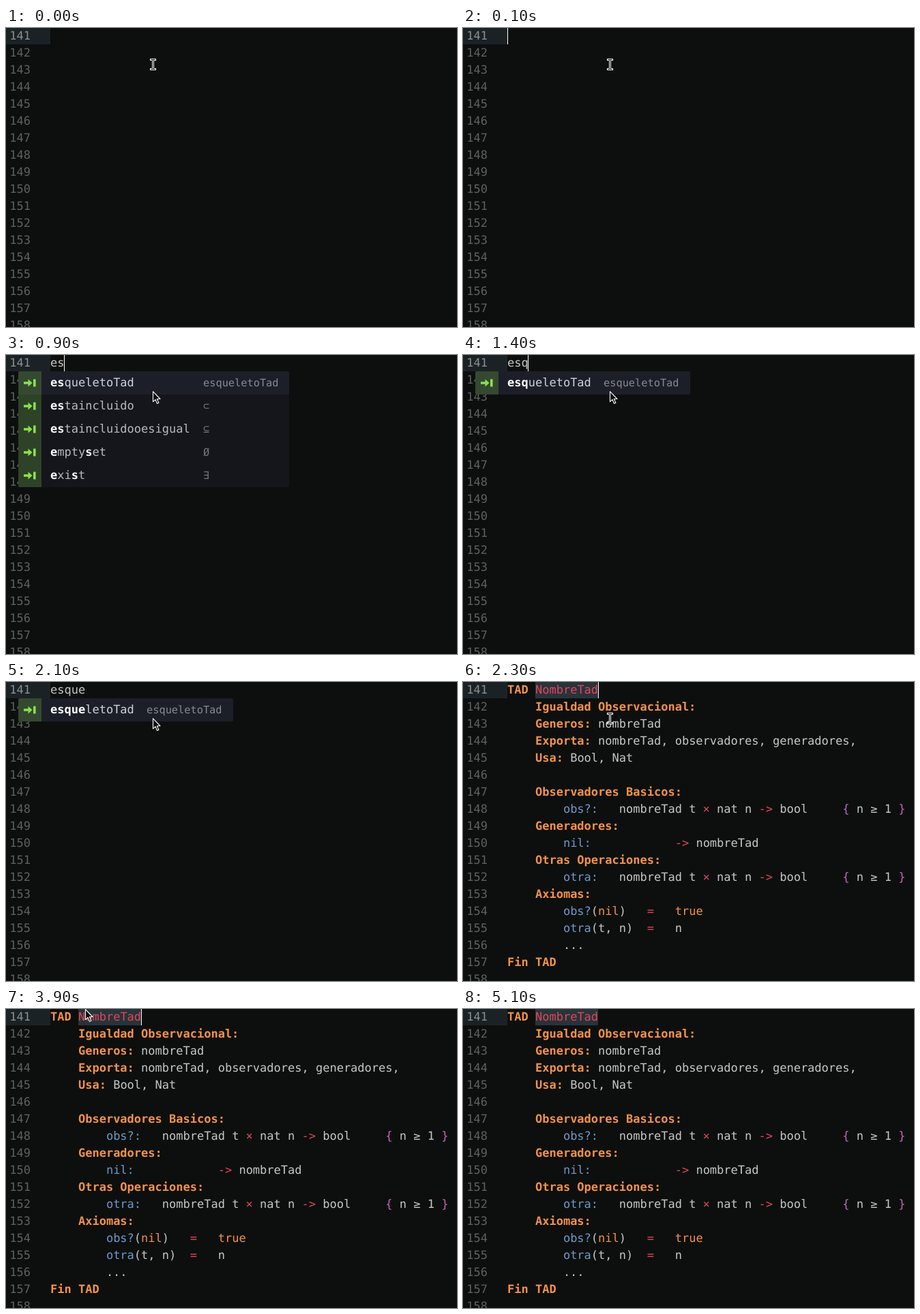
These frames come from a looping animation (661 by 439 pixels, 5200 ms). An HTML page:

```html
<!DOCTYPE html>
<html lang="es">
<head>
<meta charset="utf-8">
<title>Autocompletado</title>
<style>
  html, body { margin: 0; width: 100%; height: 100%; overflow: hidden; background: #0d0f0e; }
  #stage {
    position: relative; width: 661px; height: 439px; overflow: hidden;
    background: #0d0f0e; color: #c5c8c6;
    font: 17px/24px "DejaVu Sans Mono", monospace;
    text-rendering: geometricPrecision; font-variant-ligatures: none;
  }
  #stage div, #stage svg { position: absolute; left: 0; top: 0; }
  #stage #band { width: 65px; height: 24px; background: #1b2225; }
  #stage #pick { left: 106px; width: 92px; height: 24px; background: #29333a; }
  #nums { width: 36px; }
  #stage .num { left: auto; right: 0; color: #5d605f; }
  #stage .num:first-child { color: #8a8f90; }
  #stage .line { left: 65px; white-space: pre; }
  .k { color: #f4924c; font-weight: bold; }
  .v { color: #f0924a; }
  .r { color: #e0465a; }
  .b { color: #6f99c8; }
  .p { color: #c264c0; }
  #caret { width: 1px; height: 24px; background: #fff; }
  #stage #popup { left: 18px; top: 24px; background: #15161c; border-radius: 2px; overflow: hidden; }
  .row { width: 100%; height: 34px; line-height: 34px; color: #b6bac2; }
  .row:first-child { background: #1c1f28; color: #ced2d8; }
  .row b { color: #fff; }
  .tag { width: 34px; height: 34px; background: rgba(139, 224, 78, .22); }
  #stage .name { left: 47px; }
  .info { font-size: 15.3px; color: #74787f; }
  .row:first-child .info { color: #868a92; }
  #ibeam, #arrow { overflow: visible; }
</style>
</head>
<body>
<div id="stage">
  <div id="band"></div>
  <div id="nums"></div>
  <div id="typed" class="line"></div>
  <div id="snippet"><div id="pick"></div></div>
  <div id="caret"></div>
  <div id="popup"></div>
  <svg id="ibeam" width="1" height="1" fill="none">
    <path stroke="#fff" stroke-width="3" d="M-4 -7h9M-4 7h9M.5 -7v14"/>
    <path stroke="#000" d="M-3 -7h7M-3 7h7M.5 -7v14"/>
  </svg>
  <svg id="arrow" width="1" height="1">
    <path fill="#0b0b0b" stroke="#fff" stroke-width="1.1" stroke-linejoin="round"
      d="M.5 .6V15.6L4 12.4L6.5 18.2L8.9 17.2L6.4 11.5H11Z"/>
  </svg>
</div>
<script>
const LOOP = 5200, CHAR = 17 * 0.602, LEFT = 65, PITCH = 25;
const $ = id => document.getElementById(id);
const show = (el, on) => { el.style.display = on ? "" : "none"; };

// Markup: ~x...~ colours the enclosed text with class x.
const op = "nombreTad t ~r×~ nat n ~r->~ bool     ~p{~ n ≥ 1 ~p}~";
const code = [
  "~kTAD~ ~rNombreTad~",
  "    ~kIgualdad Observacional:~",
  "    ~kGeneros:~ nombreTad",
  "    ~kExporta:~ nombreTad, observadores, generadores,",
  "    ~kUsa:~ Bool, Nat",
  "",
  "    ~kObservadores Basicos:~",
  "        ~bobs?:~   " + op,
  "    ~kGeneradores:~",
  "        ~bnil:~            ~r->~ nombreTad",
  "    ~kOtras Operaciones:~",
  "        ~botra:~   " + op,
  "    ~kAxiomas:~",
  "        ~bobs?~(~vnil~)   ~r=~   ~vtrue~",
  "        ~botra~(t, n)  ~r=~   n",
  "        ...",
  "~kFin TAD~"
];
const paint = s => s.replace(/~(\w)(.*?)~/g, (_, c, t) =>
  `<span class="${c}">${t.replace(">", "&gt;")}</span>`);
const rows = (type, list) => list.map((html, i) =>
  `<div class="${type}" style="top:${i * PITCH}px">${html}</div>`).join("");

$("nums").innerHTML = rows("num", Array.from({ length: 18 }, (_, i) => 141 + i));
$("snippet").insertAdjacentHTML("beforeend", rows("line", code.map(paint)));

const symbols = {
  emptydot: "◦", emptyset: "Ø", entero: "ℤ", equivale: "≡", esqueletoTad: "esqueletoTad",
  estaincluido: "⊂", exist: "∃", estaincluidooesigual: "⊆"
};
const lists = {
  e: Object.keys(symbols),
  es: ["esqueletoTad", "estaincluido", "estaincluidooesigual", "emptyset", "exist"]
};
const icon = `<svg width="34" height="34" fill="#8be04e">
  <path d="M8 15.3h6.5V11.5L20.5 17L14.5 22.5V18.7H8ZM22 11.5h3.6v11H22Z"/></svg>`;

// Bolds the query letters in order of appearance.
function mark(name, query) {
  let n = 0;
  return [...name].map(c => c === query[n] ? (n++, `<b>${c}</b>`) : c)
    .join("").replace(/<\/b><b>/g, "");
}

function fillPopup(query) {
  show($("popup"), query);
  if (!query) return;
  const items = lists[query] || ["esqueletoTad"];
  const wide = items.length > 1;
  $("popup").style.width = (wide ? 397 : 315) + "px";
  $("popup").style.height = items.length * 34 + "px";
  $("popup").innerHTML = items.map((name, i) =>
    `<div class="row" style="top:${i * 34}px"><div class="tag">${icon}</div>` +
    `<div class="name">${mark(name, query)}</div>` +
    `<div class="info" style="left:${wide ? 271 : 188}px">${symbols[name]}</div></div>`).join("");
}

// Each step changes some of: text, list (popup query), done, caret, mouse [shape, x, y].
const steps = [
  [0, { text: "", list: "", done: false, caret: false, mouse: ["ibeam", 215, 53.5] }],
  [100, { caret: true }],
  [700, { text: "e", list: "e" }],
  [900, { text: "es", list: "es", mouse: ["arrow", 215, 53] }],
  [1400, { text: "esq", list: "esq" }],
  [1500, { text: "esqu", list: "esqu" }],
  [1700, { text: "esque" }],
  [1800, { list: "esque" }],
  [2100, { caret: false }],
  [2300, { text: "", list: "", done: true, caret: true, mouse: ["ibeam", 215, 53.5] }],
  [2700, { caret: false }],
  [3600, { caret: true, mouse: ["ibeam", 200, 50.5] }],
  [3700, { mouse: ["ibeam", 152, 41.5] }],
  [3800, { mouse: ["ibeam", 116, 32.5] }],
  [3900, { mouse: ["arrow", 116, 0] }],
  [4100, { caret: false, mouse: ["ibeam", 116, 0.5] }],
  [4200, { mouse: null }],
  [4600, { caret: true }],
  [5100, { caret: false }]
];

function draw(s) {
  $("typed").textContent = s.text;
  show($("snippet"), s.done);
  show($("caret"), s.caret);
  $("caret").style.left = Math.floor(LEFT + CHAR * (s.done ? 13 : s.text.length)) + "px";
  fillPopup(s.list);
  for (const id of ["ibeam", "arrow"]) {
    const on = s.mouse && s.mouse[0] === id;
    show($(id), on);
    if (on) $(id).style.transform = `translate(${s.mouse[1]}px, ${s.mouse[2]}px)`;
  }
}

let last = -1;
const start = performance.now();
function tick() {
  const t = Math.max(0, performance.now() - start) % LOOP;
  const passed = steps.filter(([at]) => at <= t);
  if (passed.length !== last) {
    last = passed.length;
    draw(Object.assign({}, ...passed.map(([, change]) => change)));
  }
  requestAnimationFrame(tick);
}
tick();
</script>
</body>
</html>
```
